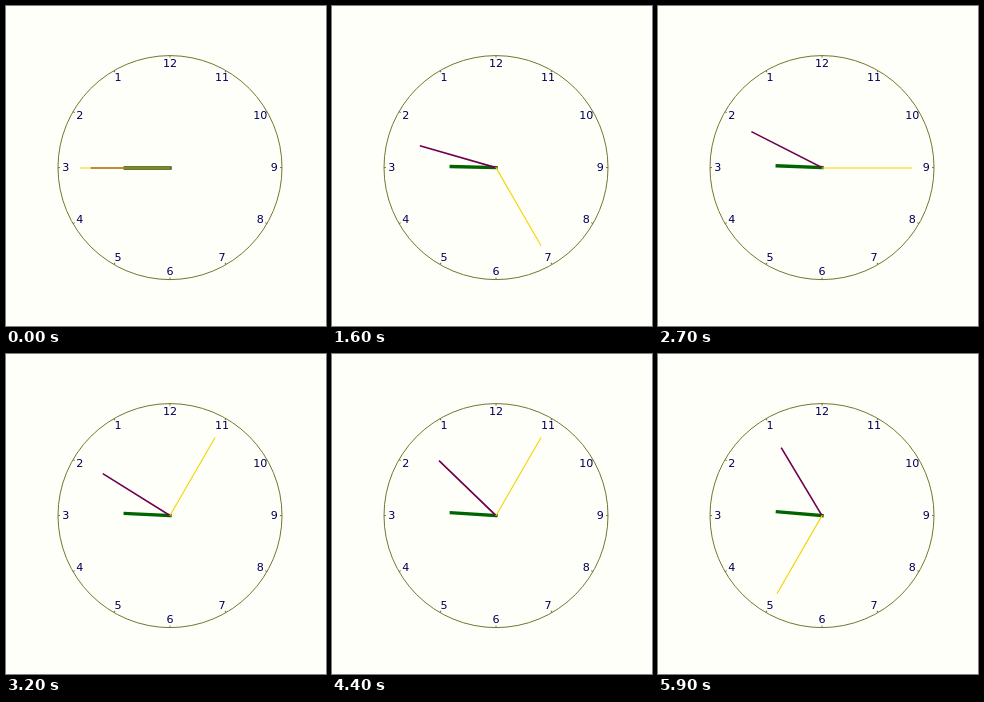
An HTML page that plays this animation: 320 by 320 pixels, repeating every 6000 ms.

```html
<!DOCTYPE html>
<html lang="en">
<head>
<meta charset="utf-8">
<title>Mirrored clock</title>
<style>
  html, body { margin: 0; height: 100%; overflow: hidden; background: #fffffa; }
  svg { display: block; width: 100vw; height: 100vh; }
  text { font: 11.1px "DejaVu Sans", sans-serif; fill: #000059; text-anchor: middle; }
  #face { fill: none; stroke: #72762f; stroke-width: 1; }
  .hand { stroke-linecap: square; }
</style>
</head>
<body>
<svg viewBox="0 0 320 320">
  <g transform="translate(164 161.6)">
    <g id="face"><circle r="112"/></g>
    <g id="labels"></g>
    <line class="hand" id="hour" x2="-44.8" stroke="#006400" stroke-width="3.33"/>
    <line class="hand" id="minute" x2="-78.4" stroke="#700050" stroke-width="1.67"/>
    <line class="hand" id="second" x2="-89.6" stroke="#f4d400" stroke-width="1.11"/>
  </g>
</svg>
<script>
const STEP = 100, STEPS = 60;
const $ = id => document.getElementById(id);

function add(parent, tag, attrs, text = "") {
  const el = document.createElementNS("http://www.w3.org/2000/svg", tag);
  for (const key in attrs) el.setAttribute(key, attrs[key]);
  el.textContent = text;
  parent.append(el);
}

// The numerals run counterclockwise from the top.
for (let n = 1; n <= 12; n++) {
  const a = n * Math.PI / 6;
  const x = -104.16 * Math.sin(a), y = 3.2 - 104.16 * Math.cos(a);
  add($("labels"), "text", { x, y }, n);
  add($("face"), "line", { y1: -112, y2: -110, transform: `rotate(${-30 * n})` });
}

// Horizontal hands snap to the pixel grid.
function turn(id, degrees) {
  const snap = degrees % 180 === 0 ? 0.4 : 0;
  $(id).setAttribute("transform", `translate(0 ${snap}) rotate(${degrees})`);
}

// Each step advances the clock by ten seconds.
function draw(now) {
  const step = Math.floor(now / STEP) % STEPS;
  turn("hour", step / 12);
  turn("minute", step);
  turn("second", step * 60 % 360);
}

const start = performance.now();
function tick() {
  draw(performance.now() - start);
  requestAnimationFrame(tick);
}
tick();
</script>
</body>
</html>
```
